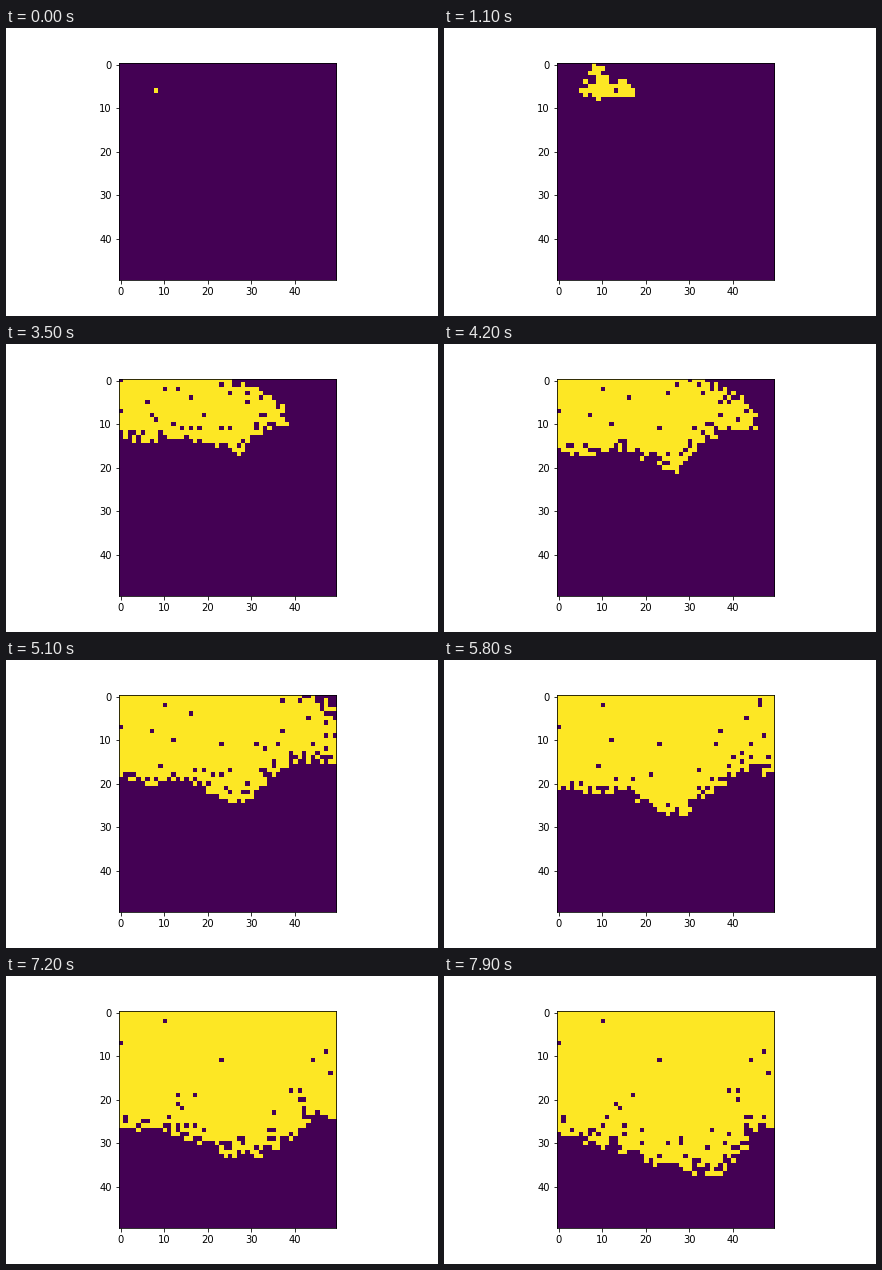
Write a matplotlib script that moves like this. It is 432 px wide and 288 px high and loops after 8 s.

```python
import numpy as np
import matplotlib.pyplot as plt
from matplotlib.animation import FuncAnimation

N, STEPS = 50, 80
SEED_ROW, SEED_COL = 6, 8


def ignition_times():
    """Step at which each cell is ready to burn once a neighbour does."""
    rng = np.random.default_rng(5)
    rows, cols = np.mgrid[:N, :N]
    c = np.arange(N)

    # Sideways: the wind drives the fire right, one leading row drifts down.
    reach = np.interp(c, [0, 5, SEED_COL, 17, 21, 49], [21, 11, 0, 9, 18, 46])
    lead = 5 + c / 8

    # Downwards: a power curve from the leading row to the final front.
    front = np.interp(c, [0, 8, 16, 24, 31, 38, 44, 49],
                      [28, 30, 32, 35, 36.5, 35.5, 28.5, 26.5])
    power = 1.1 - 0.35 * np.cos(2 * np.pi * c / 26)
    depth = np.clip((rows - lead) / (front - lead), 0, None)
    down = (STEPS - 1 - reach) * depth ** (1 / power)

    # Upwards: slower on the left, with a blunter head on the right.
    up = (2.4 - c / 45) * np.clip(lead - rows - c / 12, 0, None)

    # Uneven fuel, and a few damp cells that burn much later.
    delay = rng.exponential(4, (N, N)) - 2.5
    damp = rng.random((N, N)) < 0.035
    delay += damp * rng.exponential(25, (N, N))

    ready = np.maximum(reach + down + up + delay, reach)
    return np.where(rows == np.round(lead), reach, ready)


def spread(ready):
    fire = np.zeros((N, N), bool)
    fire[SEED_ROW, SEED_COL] = True
    history = [fire]
    for step in range(1, STEPS):
        pad = np.pad(fire, 1)
        near = np.any([pad[i:i + N, j:j + N]
                       for i in range(3) for j in range(3)], axis=0)
        fire = fire | (near & (ready <= step + 1e-6))
        history.append(fire)
    return history


history = spread(ignition_times())

plt.rcParams.update({"font.family": "DejaVu Sans", "font.size": 10})
fig, ax = plt.subplots(figsize=(6, 4), dpi=72, facecolor="white")
fig.subplots_adjust(left=0.125, right=0.9, bottom=0.125, top=0.88)
image = ax.imshow(history[0], cmap="viridis", vmin=0, vmax=1,
                  interpolation="nearest")


def update(step):
    image.set_data(history[step])
    return [image]


anim = FuncAnimation(fig, update, frames=STEPS, interval=100,
                     repeat=True, repeat_delay=0)
plt.show()
```
